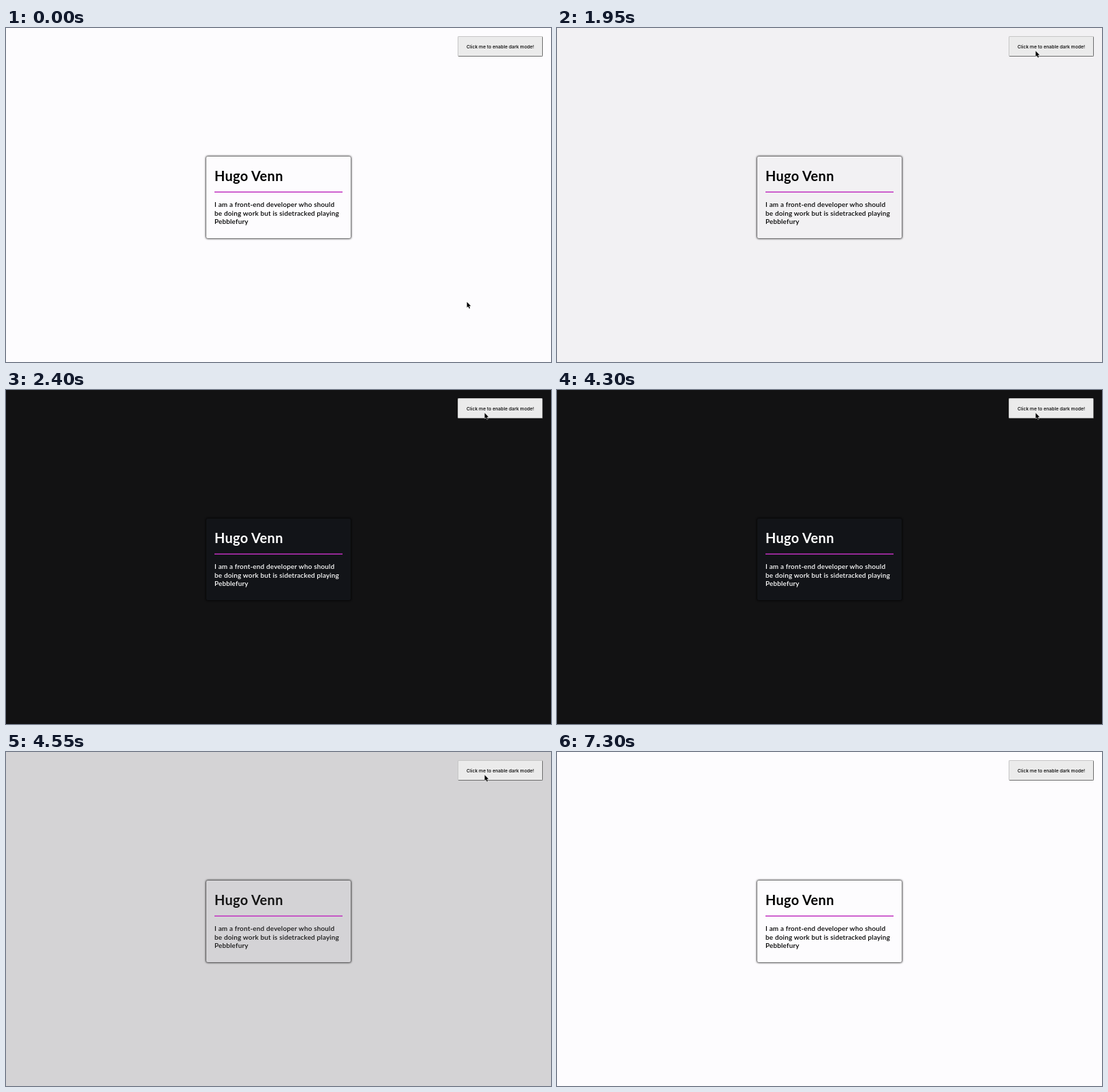
These frames come from a looping animation (800x491 px, 8.85 s). An HTML page:

```html
<!DOCTYPE html>
<html lang="en">
<head>
<meta charset="utf-8">
<title>Dark mode toggle</title>
<style>
  html, body { margin: 0; width: 100%; height: 100%; overflow: hidden; }
  body { position: relative; background: var(--page); }
  .card, .button, svg { position: absolute; box-sizing: border-box; }
  .card {
    left: 294px; top: 189px; width: 212px; height: 120px;
    border-radius: 2px; background: var(--card); box-shadow: 0 0 3px .5px #000;
  }
  .button {
    left: 663px; top: 12px; width: 125px; height: 30px;
    border: 1px solid; border-color: #c6c6c6 #6c6c6c #6c6c6c #c6c6c6;
    border-radius: 2px; background: #ebebeb;
  }
  svg { left: 0; top: 0; width: 800px; height: 491px; }
  .copy { fill: var(--ink); font: 600 10px Lato, sans-serif; letter-spacing: .15px; }
  .copy .name { font-size: 20px; font-weight: 700; letter-spacing: .3px; }
  .label { font: 500 6.85px Inter, sans-serif; }
  .rule { fill: #c030c0; }
</style>
</head>
<body>
<div class="card"></div>
<div class="button"></div>
<svg viewBox="0 0 800 491">
  <g class="copy">
    <text class="name" x="306" y="225">Hugo Venn</text>
    <text x="306" y="263.3">I am a front-end developer who should</text>
    <text x="306" y="275.5">be doing work but is sidetracked playing</text>
    <text x="306" y="287.7">Pebblefury</text>
  </g>
  <rect class="rule" x="306" y="240.4" width="188" height="1.5"/>
  <text class="label" x="676" y="29.8">Click me to enable dark mode!</text>
  <path id="cursor" d="M.6 .8V9L2.5 7.2 3.9 10.4 5.2 9.9 3.9 6.8H6.4Z"
        stroke="#fff" stroke-width=".8" paint-order="stroke"/>
</svg>
<script>
  const LOOP = 8850, STEP = 50, FADE = 440;
  const DARKEN_AT = 1922, LIGHTEN_AT = 4320, CURSOR_GONE = 7300;

  // Each pointer stroke is a cubic curve travelled between two times.
  const strokes = [
    { from: 0, to: 1050, curve: [[676, 402], [730, 200], [775, -30], [702, 33]] },
    { from: 6250, to: 6550, curve: [[702, 33], [500, 330], [560, 460], [666, 453]] },
    { from: 6950, to: 7300, curve: [[666, 453], [675, 490], [692, 470], [676, 406]] }
  ];

  const clamp = k => Math.min(1, Math.max(0, k));
  const mix = (from, to, k) => `rgb(${from.map((v, i) => Math.round(v + (to[i] - v) * k))})`;
  const cubic = (a, b, c, d, u) =>
    a * (1 - u) ** 3 + 3 * b * u * (1 - u) ** 2 + 3 * c * u * u * (1 - u) + d * u ** 3;

  // CSS "ease": cubic-bezier(.25, .1, .25, 1)
  function ease(x) {
    if (x <= 0 || x >= 1) return clamp(x);
    let low = 0, high = 1;
    for (let i = 0; i < 24; i++) {
      const mid = (low + high) / 2;
      if (cubic(0, .25, .25, 1, mid) < x) low = mid; else high = mid;
    }
    return cubic(0, .1, 1, 1, low);
  }

  function pointerAt(t) {
    const { from, to, curve } = strokes.findLast(s => s.from <= t);
    const k = clamp((t - from) / (to - from));
    const u = k * k * (3 - 2 * k);
    return [0, 1].map(axis => cubic(...curve.map(p => p[axis]), u));
  }

  const cursor = document.getElementById("cursor");
  const setColor = (name, value) => document.body.style.setProperty(name, value);

  function draw(t) {
    const dark = ease((t - DARKEN_AT) / FADE) - ease((t - LIGHTEN_AT) / FADE);
    setColor("--page", mix([253, 252, 254], [18, 18, 19], dark));
    setColor("--card", mix([253, 252, 254], [18, 20, 24], dark));
    setColor("--ink", mix([0, 0, 0], [255, 255, 255], dark ** 1.4));
    cursor.setAttribute("transform", `translate(${pointerAt(t)})`);
    cursor.setAttribute("visibility", t < CURSOR_GONE ? "visible" : "hidden");
  }

  const start = performance.now();
  function tick() {
    const t = Math.max(0, performance.now() - start) % LOOP;
    draw(Math.floor(t / STEP) * STEP);
    requestAnimationFrame(tick);
  }
  tick();
</script>
</body>
</html>
```
